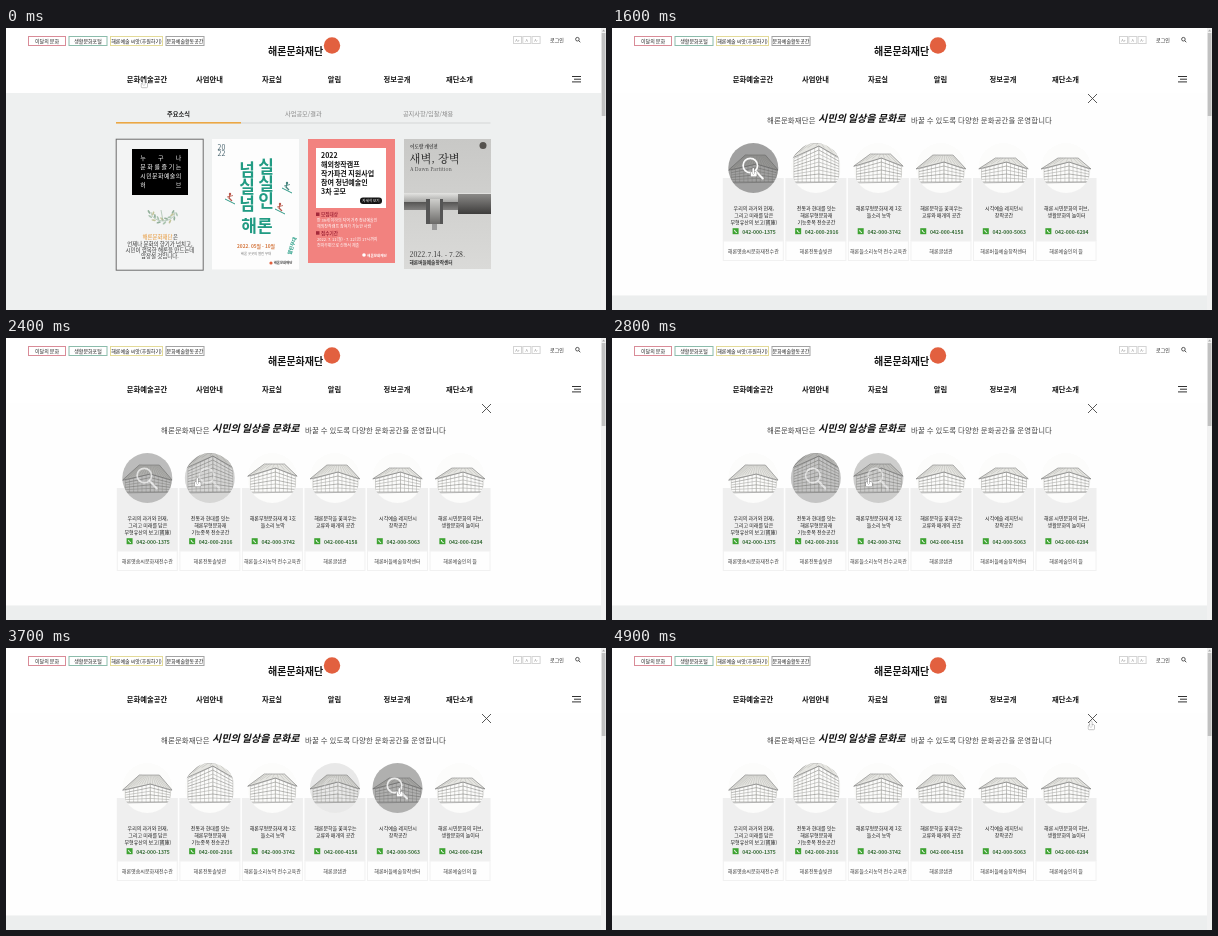
Recreate the animation shown at these times as an HTML page with a canvas. Size 600 by 282 pixels, loop 5000 ms.

```html
<!DOCTYPE html>
<html lang="ko">
<head>
<meta charset="utf-8">
<style>
html, body { margin: 0; width: 100%; height: 100%; overflow: hidden; background: #fff; }
canvas { display: block; width: 600px; height: 282px; }
</style>
</head>
<body>
<canvas id="stage"></canvas>
<script>
const W = 600, H = 282, LOOP = 5000, STEP = 100;
const OPEN_AT = 900, CLOSE_ICON_AT = 1000, FADE = 300;
const RADIUS = 25, CIRCLE_Y = 140;
const SANS = '"Noto Sans CJK KR", "Noto Sans CJK", sans-serif';
const SERIF = '"Noto Serif CJK KR", "Noto Serif", serif';
const canvas = document.getElementById('stage');
const g = canvas.getContext('2d');
const dpr = window.devicePixelRatio || 1;
canvas.width = W * dpr;
canvas.height = H * dpr;

const TAGS = [
  ['이달의 문화', 37, '#d98c98'], ['생활문화포털', 38, '#8cbcab'],
  ['해론예술 씨앗(후원하기)', 52, '#e3da98'], ['문화예술활동공간', 38, '#a3a3a3']
];
const NAV = ['문화예술공간', '사업안내', '자료실', '알림', '정보공개', '재단소개'];
const PLACES = [
  { lines: ['우리의 과거와 현재,', '그리고 미래를 담은', '무형유산의 보고(寶庫)'], tel: '042-000-1375', name: '해론옛솜씨문화재전수관', height: 18, roof: 9 },
  { lines: ['전통과 현대를 잇는', '해론무형문화재', '기능종목 전승공간'], tel: '042-000-2916', name: '해론전통솔빛관', height: 36, roof: 3 },
  { lines: ['해론무형문화재 제 1호', '들소리 농악'], tel: '042-000-3742', name: '해론들소리농악 전수교육관', height: 24, roof: 4 },
  { lines: ['해론문학을 꽃피우는', '교류와 매개의 공간'], tel: '042-000-4158', name: '해론글샘관', height: 20, roof: 7 },
  { lines: ['시각예술 레지던시', '창작공간'], tel: '042-000-5063', name: '해론버들예술창작센터', height: 20, roof: 4 },
  { lines: ['해론 시민문화의 허브,', '생활문화의 놀이터'], tel: '042-000-6294', name: '해론예술인의 뜰', height: 20, roof: 4 }
];
const column = i => 141.3 + i * 62.55;

// Pointer stops: time, x, y
const PATH = [
  [0, 138, 51], [1000, 138, 51],
  [1500, column(0), CIRCLE_Y], [2100, column(0), CIRCLE_Y],
  [2700, column(1.6), CIRCLE_Y], [4100, column(5), CIRCLE_Y],
  [4400, column(5), CIRCLE_Y], [4700, 479, 73], [LOOP, 479, 73]
];

const mix = (a, b, k) => a + (b - a) * k;

function pointer(t) {
  const n = PATH.findIndex(p => p[0] > t);
  const a = PATH[n - 1], b = PATH[n];
  const k = (t - a[0]) / (b[0] - a[0]);
  return [mix(a[1], b[1], k), mix(a[2], b[2], k)];
}

// Eased share of the last FADE ms that the pointer spent on a circle.
function hover(i, t) {
  const n = 30;
  let inside = 0;
  for (let k = 0; k < n; k++) {
    const [x, y] = pointer(Math.max(0, t - FADE * k / n));
    if (Math.hypot(x - column(i), y - CIRCLE_Y) < RADIUS) inside++;
  }
  return Math.sin(inside / n * Math.PI / 2);
}

function rect(x, y, w, h, fill) {
  g.fillStyle = fill;
  g.fillRect(x, y, w, h);
}

function frame(x, y, w, h, color, width = 1) {
  g.strokeStyle = color;
  g.lineWidth = width;
  g.strokeRect(x, y, w, h);
}

function line(pts, color, width = 1) {
  g.strokeStyle = color;
  g.lineWidth = width;
  g.beginPath();
  for (let i = 0; i < pts.length; i += 2) g.lineTo(pts[i], pts[i + 1]);
  g.stroke();
}

function shape(pts, fill) {
  g.fillStyle = fill;
  g.beginPath();
  for (let i = 0; i < pts.length; i += 2) g.lineTo(pts[i], pts[i + 1]);
  g.closePath();
  g.fill();
}

function disc(x, y, r, fill) {
  g.fillStyle = fill;
  g.beginPath();
  g.arc(x, y, r, 0, Math.PI * 2);
  g.fill();
}

function ring(x, y, r, color, width) {
  g.strokeStyle = color;
  g.lineWidth = width;
  g.beginPath();
  g.arc(x, y, r, 0, Math.PI * 2);
  g.stroke();
}

function text(str, x, y, size, color = '#222', { weight = 400, align = 'center', font = SANS, style = '', gap = 0 } = {}) {
  g.font = `${style} ${weight} ${size}px ${font}`;
  g.letterSpacing = gap + 'px';
  g.textAlign = align;
  g.textBaseline = 'middle';
  g.fillStyle = color;
  g.fillText(str, x, y);
}

function stack(lines, x, y, lead, size, color, options) {
  lines.forEach((s, i) => text(s, x, y + i * lead, size, color, options));
}

// Sets the letters evenly from x0 to x1.
function spread(str, x0, x1, y, size, color) {
  [...str].forEach((c, i) => text(c, mix(x0, x1, i / (str.length - 1)), y, size, color));
}

function fall(y0, y1, c0, c1) {
  const fill = g.createLinearGradient(0, y0, 0, y1);
  fill.addColorStop(0, c0);
  fill.addColorStop(1, c1);
  return fill;
}

function header() {
  rect(0, 0, 595, 65, '#fff');
  let x = 22;
  for (const [label, w, color] of TAGS) {
    frame(x + .5, 8.5, w, 9, color);
    text(label, x + w / 2 + .5, 12.8, 5, '#222', { weight: 500 });
    x += w + 3.5;
  }
  text('해론문화재단', 262, 23, 10, '#161616', { weight: 900, align: 'left' });
  disc(326, 17.5, 8.2, '#e2603f');

  ['A+', 'A', 'A-'].forEach((s, i) => {
    frame(507.5 + i * 9.3, 8.5, 8, 7, '#d4d4d4');
    text(s, 511.5 + i * 9.3, 12, 4, '#999');
  });
  text('로그인', 551, 11.7, 5, '#222', { weight: 500 });
  ring(571.4, 11.2, 1.8, '#333', .8);
  line([572.7, 12.6, 574.3, 14.2], '#333', .9);

  NAV.forEach((s, i) => text(s, 141 + i * 62.5, 51, 7.3, '#151515', { weight: 700 }));
  for (let i = 0; i < 3; i++) rect(566 + i % 2 * 2, 48 + i * 2.7, 9 - i % 2 * 2, 1, '#333');
}

function scrollbar() {
  rect(595, 0, 5, H, '#f1f1f1');
  rect(595.7, 5, 3.8, 83, '#c1c1c1');
  shape([596, 3.4, 597.6, 1.6, 599.2, 3.4], '#aaa');
}

function wreath(x, y) {
  const tints = ['#93b09b', '#abc4b0', '#c3c59a'];
  for (let i = 0; i < 16; i++) {
    const a = Math.PI * i / 15, side = i % 2 ? 1 : -1;
    g.fillStyle = tints[i % 3];
    g.beginPath();
    g.ellipse(x + Math.cos(a) * (12 + side * 2), y + Math.sin(a) * (9 + side * 2), 2.2, .9, a + side, 0, Math.PI * 2);
    g.fill();
  }
  g.strokeStyle = tints[0];
  g.lineWidth = .6;
  g.beginPath();
  g.ellipse(x, y, 12, 9, 0, 0, Math.PI);
  g.stroke();
  line([x, y + 9, x - 2, y - 2], tints[0], .6);
}

function introCard() {
  rect(110, 111, 87.5, 131.5, '#f3f4f4');
  frame(110.2, 111.2, 87, 131, '#6b6b6b');
  rect(126, 121, 56, 46, '#000');
  ['누구나', '문화를즐기는', '시민문화예술의', '허브'].forEach((s, i) =>
    spread(s, 137, 172.5, 129.5 + i * 9.2, 6, '#fff'));
  wreath(157, 184);
  text('해론문화재단', 151.5, 209, 5.45, '#e79430', { weight: 500 });
  text('은', 169.5, 209, 5.45, '#333');
  stack(['언제나 문화의 향기가 넘치고,', '시민이 행복한 해론을 만드는데', '앞장설 것입니다.'], 153.8, 215.5, 6.4, 5.45, '#333');
}

function dancer(x, y, color) {
  disc(x, y, 1.2, color);
  line([x, y + 1, x - 1, y + 4, x + 2, y + 7], color, 1.3);
  line([x - 3, y + 3, x + 3, y + 1.5], color, .8);
  line([x - 5, y + 5, x + 5, y + 10], '#2f9a87', 1);
}

function dancePoster() {
  const teal = '#219b83', heavy = { weight: 900 };
  rect(206, 111, 87, 130.5, '#fdfdfd');
  stack(['20', '22'], 215.5, 119, 6, 7, '#4b6670');
  stack([...'넘실넘'], 241, 142, 17, 17, teal, heavy);
  stack([...'실실인'], 260, 139, 17, 17, teal, heavy);
  text('해론', 251, 198, 17, teal, heavy);
  dancer(224, 166, '#b8574a');
  dancer(281, 155, '#46857e');
  dancer(274, 176, '#b8574a');
  text('2022. 05월 - 10월', 250, 218, 4.8, '#d4743a', { weight: 800 });
  text('해론 곳곳의 열린 무대', 250, 225.5, 3.4, '#777');
  g.save();
  g.translate(286, 218);
  g.rotate(-1.25);
  text('열린무대', 0, 0, 5, teal, { weight: 800 });
  g.restore();
  disc(265, 235, 1.6, '#e2603f');
  text('해론문화재단', 277, 235, 3.4, '#444', { weight: 700 });
}

function callPoster() {
  const left = { align: 'left' }, bold = { align: 'left', weight: 800 };
  rect(302, 111, 87, 124, '#f2827f');
  rect(310, 120, 70, 60, '#fff');
  stack(['2022', '해외창작캠프', '작가파견 지원사업', '참여 청년예술인', '3차 공모'], 315, 127.5, 9, 7, '#141414', bold);
  g.fillStyle = '#151515';
  g.beginPath();
  g.roundRect(354, 169.5, 22, 6.5, 3);
  g.fill();
  text('자세히 보기', 365, 172.6, 3.6, '#fff');
  ['모집대상', '접수기간'].forEach((s, i) => {
    const y = 186.5 + i * 18.7;
    rect(310, y - 2, 3.5, 3.5, '#a3283a');
    text(s, 315, y, 4.6, '#a3283a', bold);
  });
  stack(['만 39세 이하의 지역 거주 청년예술인', '해외창작캠프 참여가 가능한 사람'], 311, 192, 6, 4, '#fff', left);
  stack(['2022. 7. 11(월) - 7. 22(금) 17시까지', '전자우편으로 신청서 제출'], 311, 211, 6, 4, '#fff', left);
  disc(358, 227, 1.8, '#fff');
  text('해론문화재단', 371, 227.5, 3.6, '#fff', { weight: 700 });
}

function showPoster() {
  const serif = { align: 'left', font: SERIF };
  rect(398, 111, 87, 130, fall(111, 241, '#c8c8c6', '#dadad8'));
  text('이도람 개인전', 404, 118, 4.6, '#333', { align: 'left', font: SERIF, weight: 600 });
  text('새벽, 장벽', 403.5, 131, 11.3, '#202020', serif);
  text('A Dawn Partition', 404, 141, 5, '#444', serif);
  disc(477, 117.5, 3.5, '#55524e');
  rect(398, 165, 87, 9, fall(165, 174, '#e4e4e2', '#a5a5a3'));
  rect(398, 174, 87, 8, fall(174, 182, '#555453', '#828180'));
  rect(452, 166, 33, 20, fall(166, 186, '#8b8a88', '#3d3c3b'));
  rect(420, 171, 17, 25, fall(171, 196, '#cfcfcc', '#6b6a68'));
  rect(420, 171, 4, 25, '#555');
  rect(434, 171, 3, 25, '#555');
  rect(426, 196, 5, 6, '#999');
  text('2022.7.14. - 7.28.', 403.5, 226.5, 7, '#222', serif);
  text('해론버들예술창작센터', 403.5, 234, 4.7, '#333', { align: 'left', weight: 600 });
}

function home() {
  rect(0, 65, 595, 217, '#eef0f0');
  rect(235, 94.5, 249.5, 1, '#d6d8d8');
  rect(110, 94, 125, 1.6, '#eba744');
  ['주요소식', '사업공모/결과', '공지사항/입찰/채용'].forEach((s, i) =>
    text(s, 172.5 + i * 124.8, 86, 6.2, i ? '#888' : '#222', { weight: i ? 400 : 700 }));
  introCard();
  dancePoster();
  callPoster();
  showPoster();
}

// One wall in perspective, ruled into windows.
function wall(x0, top0, x1, top1, base, cols, rows) {
  for (let i = 0; i <= cols; i++) {
    const x = mix(x0, x1, i / cols);
    line([x, mix(top0, top1, i / cols), x, base], '#a5a5a1', .45);
  }
  for (let j = 0; j <= rows; j++) {
    const k = j / rows;
    line([x0, mix(top0, base, k), x1, mix(top1, base, k)], j % 2 ? '#8a8a86' : '#aaaaa6', .6);
  }
}

function building({ height, roof }) {
  const base = 14, top = base - height, edge = top + height * .35;
  const rows = Math.round(height / 4);
  wall(-22, edge, 3, top, base, 6, rows);
  wall(3, top, 23, edge, base, 5, rows);
  const eaves = [-25, edge, 3, top, 25, edge];
  shape([...eaves, 12, top - roof, -8, top - roof], '#e6e6e2');
  for (let i = 0; i <= roof * 2; i++) {
    const k = i / (roof * 2);
    line([mix(-8, 12, k), top - roof, mix(-25, 25, k), edge - Math.sin(k * Math.PI) * (edge - top)], '#a9a9a5', .4);
  }
  line(eaves, '#777', .7);
  line([-25, edge, -8, top - roof, 12, top - roof, 25, edge], '#888', .6);
  line([-24, base + 1, 24, base], '#999', .6);
}

function lens(x, y) {
  ring(x - 3, y - 2.5, 7.2, '#fff', 1.7);
  g.lineCap = 'round';
  line([x + 2.6, y + 3.2, x + 9.5, y + 10.5], '#fff', 2);
  g.lineCap = 'butt';
}

function place(p, i, t) {
  const x = column(i);
  rect(x - 30.5, 150, 61, 63, '#efefef');
  frame(x - 30, 213, 60, 19.5, '#f1f1f1');

  g.save();
  g.beginPath();
  g.arc(x, CIRCLE_Y, RADIUS, 0, Math.PI * 2);
  g.clip();
  rect(x - RADIUS, CIRCLE_Y - RADIUS, RADIUS * 2, RADIUS * 2, '#fcfcfb');
  g.translate(x, CIRCLE_Y);
  building(p);
  g.restore();

  g.globalAlpha = hover(i, t);
  disc(x, CIRCLE_Y, RADIUS, 'rgba(80,80,80,.55)');
  lens(x, CIRCLE_Y);
  g.globalAlpha = 1;

  stack(p.lines, x + .5, 179.6, 7.2, 5, '#222', { weight: 500 });
  rect(x - 20.7, 200.2, 6, 6, '#3ea332');
  g.strokeStyle = '#fff';
  g.lineWidth = 1;
  g.beginPath();
  g.arc(x - 16, 201.8, 2.8, 1.7, 3.1);
  g.stroke();
  text(p.tel, x - 11, 203.7, 5.05, '#356b35', { weight: 600, align: 'left' });
  text(p.name, x, 223.3, 5.05, '#444');
}

function panel(t) {
  rect(0, 65, 595, 217, '#eceeee');
  rect(0, 65, 595, 202.5, '#fefefe');
  const soft = { align: 'left', gap: .15 };
  text('해론문화재단은', 155, 92, 7.4, '#444', soft);
  text('시민의 일상을 문화로', 206, 90.5, 10, '#111', { weight: 900, align: 'left', style: 'italic' });
  text('바꿀 수 있도록 다양한 문화공간을 운영합니다', 299, 92, 7.4, '#444', soft);
  if (t >= CLOSE_ICON_AT) {
    line([476, 66, 485, 75], '#444', .9);
    line([485, 66, 476, 75], '#444', .9);
  }
  PLACES.forEach((p, i) => place(p, i, t));
}

function hand(x, y) {
  const part = (dx, dy, w, h) => {
    g.beginPath();
    g.roundRect(x + dx, y + dy, w, h, .9);
    g.stroke();
    g.fill();
  };
  g.fillStyle = '#fff';
  g.strokeStyle = '#666';
  g.lineWidth = .7;
  part(-2.6, 4, 6, 4.6);
  part(-.9, 0, 1.7, 6);
}

function draw(t) {
  g.setTransform(dpr, 0, 0, dpr, 0, 0);
  header();
  if (t < OPEN_AT) home();
  else panel(t);
  scrollbar();
  hand(...pointer(t));
}

let last = -1;
const start = performance.now();
function tick() {
  const t = Math.floor(((performance.now() - start) % LOOP) / STEP) * STEP;
  if (t !== last) draw(last = t);
  requestAnimationFrame(tick);
}
tick();
</script>
</body>
</html>
```
